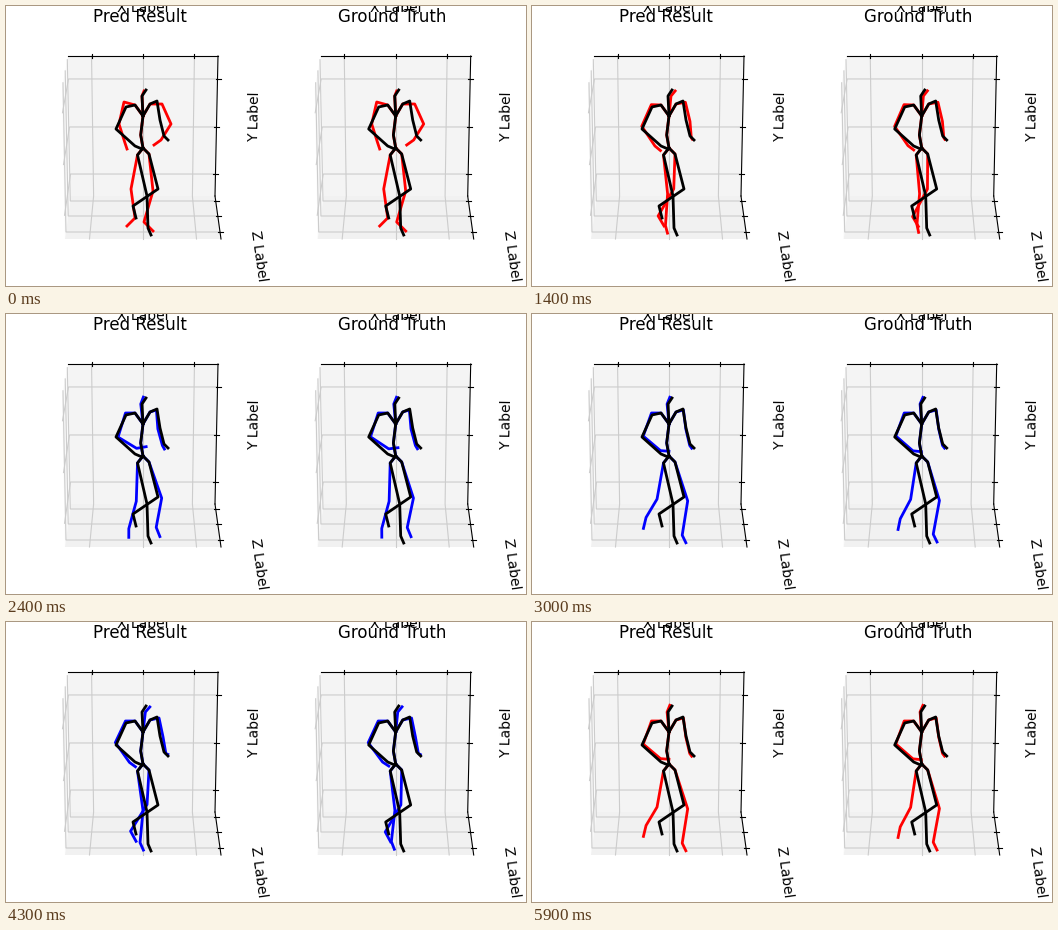
Recreate the animation shown at these times as a matplotlib script. Size 520 px wide and 280 px high, loop 6 s.

```python
import numpy as np
import matplotlib.pyplot as plt
from matplotlib.animation import FuncAnimation
from matplotlib.patches import Polygon

W, H, DPI = 520, 280, 100
FRAMES, STEP_MS = 60, 100
GAP = 252.7                     # distance between the two panels
BLUE_SPAN = range(20, 50)
CYCLE = 29                      # frames per double step
SETTLE = 18                     # frames until the opening pose has faded

# Where each chain starts: fixed points of the trunk
ROOT, CHEST = (137, 142), (137, 110)
TRUNK = dict(
    head=[ROOT, (134.7, 129), CHEST],
    arm_l=[CHEST, (129, 99)],
    arm_r=[CHEST, (144, 98)],
    leg_l=[ROOT, (131.5, 149)],
    leg_r=[ROOT, (143, 148)])

STILL = dict(
    head=[(136, 90), (140, 84)],
    arm_l=[(120, 101), (110, 123), (129, 140), (136, 143)],
    arm_r=[(151, 95), (154, 114), (158, 130), (162, 134)],
    leg_l=[(141, 190), (142, 222), (145, 229)],
    leg_r=[(152, 183), (127, 200), (130, 212)])

OPENING = dict(
    head=[(136, 90), (138, 85)],
    arm_l=[(118, 96), (113, 118), (119, 137), (121, 143)],
    arm_r=[(156, 98), (165, 118), (155, 134), (148, 139)],
    leg_l=[(125, 183), (129, 212), (121, 220)],
    leg_r=[(147, 185), (138, 216), (147, 225)])

# Per chain: frames at which x and y peak, then centre and swing of each joint
SWING = dict(
    head=((12, 12), [(137, 90), (140.5, 84)], [(2.5, 0), (3.5, 1)]),
    arm_l=((25, 10),
           [(119.5, 99), (110.5, 121.5), (126.5, 138), (134, 140)],
           [(0, 0), (1.5, -1.5), (4, 3.5), (6, 7)]),
    arm_r=((10, 25),
           [(152, 96), (155, 115), (158.5, 131.5), (160.5, 133.5)],
           [(1.5, 0), (3, 0), (2, 0), (2, 1.5)]),
    leg_l=((16, 17.5),
           [(131.3, 187), (124.5, 213), (125, 222)],
           [(6, 2), (10, 10), (13, 8)]),
    leg_r=((27, 3),
           [(149, 184.5), (138.5, 214.5), (143, 223.5)],
           [(8, 2.5), (14, 7), (13, 5.5)]))


def walk(frame, stride):
    """Every joint swings on a cosine; the opening pose fades out first."""
    fade = np.cos(np.pi / 2 * min(frame / SETTLE, 1)) ** 2
    joints = {}
    for name, (peaks, centre, swing) in SWING.items():
        wave = np.cos(2 * np.pi * (frame - np.array(peaks)) / CYCLE)
        moving = np.array(centre) + stride * np.array(swing) * wave
        joints[name] = moving * (1 - fade) + np.array(OPENING[name]) * fade
    return joints


def bones(joints):
    return [np.vstack([TRUNK[name], joints[name]]) for name in TRUNK]


fig = plt.figure(figsize=(W / DPI, H / DPI), dpi=DPI, facecolor="white")
ax = fig.add_axes([0, 0, 1, 1])
ax.set_xlim(0, W)
ax.set_ylim(H, 0)
ax.axis("off")

# Corners of the box: back wall, then the near edge
TL, TR, BL, BR = (62, 50), (212, 50), (65, 190), (209, 190)
NEAR_T, NEAR_L, NEAR_R = (56, 82), (59, 233), (215, 233)


def mix(a, b, t):
    return a[0] + (b[0] - a[0]) * t, a[1] + (b[1] - a[1]) * t


def draw_box(dx):
    def pane(corners, shade):
        ax.add_patch(Polygon([(x + dx, y) for x, y in corners],
                             facecolor=shade, edgecolor="none", zorder=1))

    def line(*points, color="black", z=3):
        xs, ys = zip(*points)
        ax.plot(np.add(xs, dx), ys, color=color, lw=0.8, zorder=z)

    def grid(*points):
        line(*points, color="#cccccc", z=2)

    def side_tick(x, y):
        line((x - 2, y), (x + 3, y))

    pane([TL, BL, NEAR_L, NEAR_T], "0.975")
    pane([TL, TR, BR, BL], "0.9575")
    pane([BL, BR, NEAR_R, NEAR_L], "0.945")

    for t in (0.157, 0.5, 0.843):
        top = mix(TL, TR, t)
        grid(top, mix(BL, BR, t), mix(NEAR_L, NEAR_R, t))
        line((top[0], 48), (top[0], 52))
    for t in (0.164, 0.507, 0.843):
        right = mix(TR, BR, t)
        grid(mix(NEAR_T, NEAR_L, t), mix(TL, BL, t), right)
        side_tick(*right)
    for t in (0.116, 0.465, 0.837):
        right = mix(BR, NEAR_R, t)
        grid(mix(TL, NEAR_T, t), mix(BL, NEAR_L, t), right)
        side_tick(*right)
    line(TL, TR)
    line(TR, BR)
    line(BR, NEAR_R)


def draw_text(dx, title):
    def put(x, y, text, size=10, **style):
        ax.text(x + dx, y, text, fontsize=size, family="DejaVu Sans",
                ha="center", zorder=6, **style)

    put(133.8, 16.5, title, 12, va="baseline")
    put(136.8, 6.5, "X Label", va="baseline")
    put(248.3, 110.6, "Y Label", va="center", rotation=88.8, rotation_mode="anchor")
    put(252.7, 249.5, "Z Label", va="center", rotation=-82, rotation_mode="anchor")


def draw_figure(joints, dx, color, z):
    return [ax.plot(b[:, 0] + dx, b[:, 1], color=color, lw=2, zorder=z)[0]
            for b in bones(joints)]


walkers = []
for dx, title, stride in ((0, "Pred Result", 1.05), (GAP, "Ground Truth", 0.9)):
    draw_box(dx)
    draw_text(dx, title)
    draw_figure(STILL, dx, "black", 5)
    walkers.append((dx, stride, draw_figure(OPENING, dx, "red", 4)))


def update(frame):
    color = "blue" if frame in BLUE_SPAN else "red"
    for dx, stride, limbs in walkers:
        for limb, b in zip(limbs, bones(walk(frame, stride))):
            limb.set_data(b[:, 0] + dx, b[:, 1])
            limb.set_color(color)
    return [limb for _, _, limbs in walkers for limb in limbs]


anim = FuncAnimation(fig, update, frames=FRAMES, interval=STEP_MS,
                     init_func=lambda: update(0), repeat=True, repeat_delay=0)
plt.show()
```
